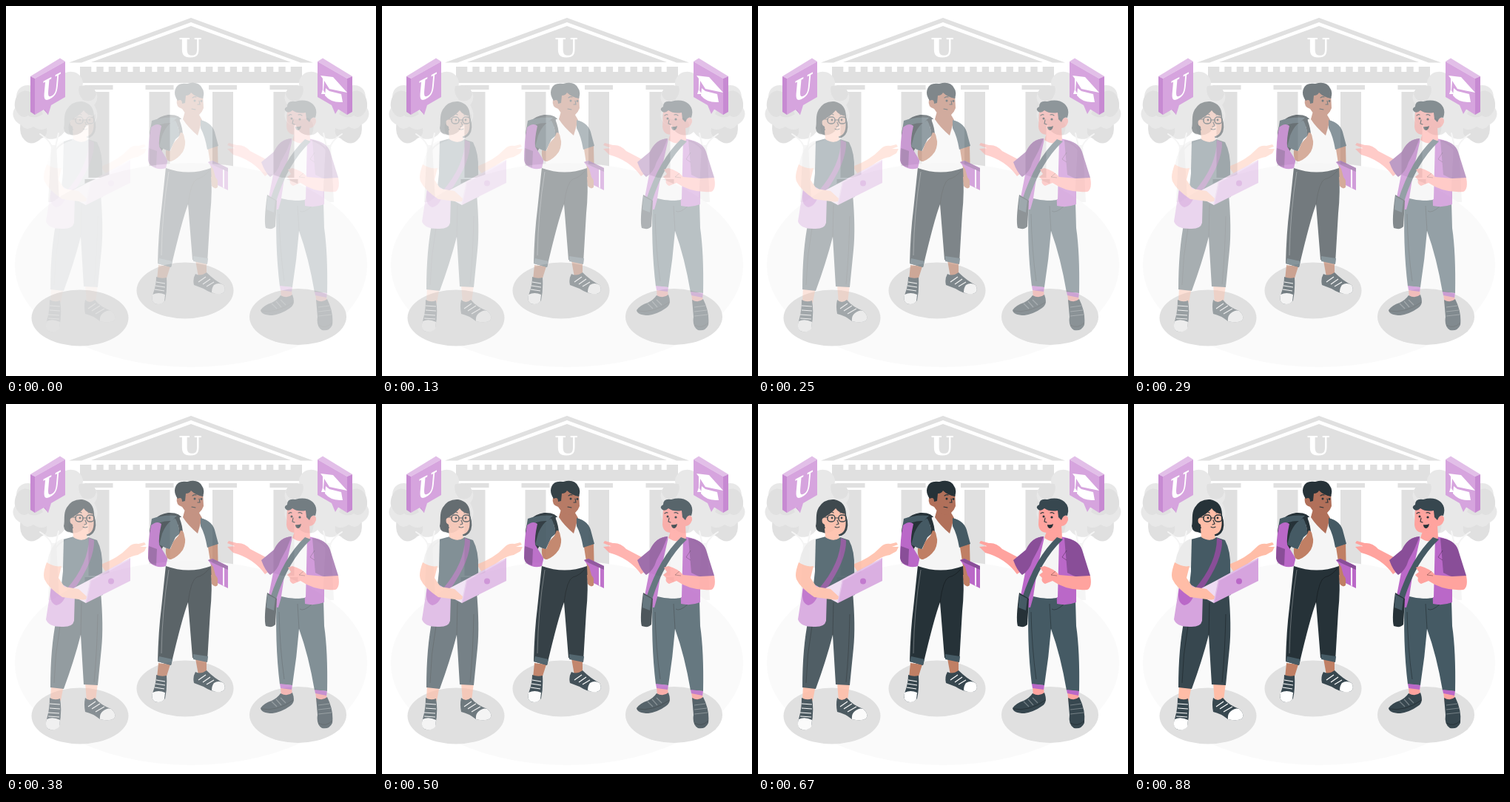
An HTML page that plays this animation: 500x500 px, repeating every 930 ms.

```html
<!DOCTYPE html>
<html lang="en">
<head>
<meta charset="utf-8">
<title>Students</title>
<style>
html, body { margin: 0; width: 100%; height: 100%; overflow: hidden; background: #fff; }
svg { display: block; width: 100vw; height: 100vh; }
text { font: bold 36px "DejaVu Serif", serif; text-anchor: middle; fill: #fff; }
.g { fill: #e0e0e0 } .w { fill: #fff } .off { fill: #f5f5f5 }
.k { fill: #263238 } .d { fill: #37474f } .s { fill: #455a64 }
.p { fill: #ba68c8 } .pl { fill: #d6a4de } .pt { fill: #e2bfe8 } .pd { fill: #894e98 } .ps { fill: #c78ad2 }
.tan { fill: #b1705a } .brown { fill: #c07f64 } .peach { fill: #ffbda7 } .pink { fill: #ffa39e }
.line { fill: none; stroke: #263238; stroke-width: 1.1; stroke-linecap: round }
.lace { fill: none; stroke: #fff; stroke-width: 1.2 }
.crease { fill: none; stroke: #000; stroke-opacity: .3; stroke-width: 1 }
</style>
</head>
<body>
<svg viewBox="0 0 500 500">
  <defs>
    <g id="tree">
      <path fill="#e8e8e8" d="M19 160C5 152 8 137 18 134C7 116 22 103 35 108C40 91 67 85 77 92C93 82 108 97 103 109C121 105 129 123 119 134C129 149 121 163 108 161C105 176 85 178 79 170C69 184 53 180 50 176C41 191 18 185 19 160Z"/>
      <path class="g" d="M12 137C10 118 25 109 35 118V137Q47 136 50 146Q38 154 30 148Q19 155 12 137ZM20 160Q27 170 37 163Q47 170 55 165Q57 176 47 179Q35 191 25 181Q17 173 20 160ZM99 108Q119 104 122 119Q119 132 104 127Q96 118 99 108ZM92 151Q109 158 121 146Q122 162 108 161Q103 176 87 174Q80 160 92 151Z"/>
      <path fill="none" stroke="#f5f5f5" stroke-width="2" stroke-linecap="round" d="M63 194Q61 182 46 173M66 194L71 172M65 199Q70 186 88 181"/>
      <path fill="#f5f5f5" d="M61 188H68L72 265H57Z"/>
    </g>
  </defs>

  <path class="g" d="M85 76.5L250 16L415 76.5H398L250 22L102 76.5ZM115 76L250 27L385 76ZM100 82H400V104H100Z"/>
  <path stroke="#fff" stroke-width="7" stroke-dasharray="7 9.4" d="M115.300 85.500H385"/>
  <text x="249" y="69">U</text>
  <g id="columns" class="g"></g>
  <use href="#tree"/>
  <use href="#tree" transform="matrix(-1 0 0 1 500 0)"/>
  <ellipse cx="250" cy="350" rx="238" ry="138" fill="#fafafa"/>
  <g class="g">
    <ellipse cx="100" cy="421.500" rx="65.500" ry="38"/>
    <ellipse cx="242" cy="384.500" rx="65.500" ry="38"/>
    <ellipse cx="394.500" cy="420" rx="65.500" ry="38"/>
  </g>

  <path class="pt" d="M33 95L73 70.500L80 75L39 98Z"/>
  <path class="ps" d="M33 95L39 98V147L33 143ZM51 140L57 137V147Z"/>
  <path class="pl" d="M39 98L80 75V123L61 134L57 147L52 139.500L39 147Z"/>
  <text transform="matrix(.8 -.42 -.1 1.120 59.500 125)">U</text>
  <path class="pt" d="M421 75L428 70.500L468 95L461 98Z"/>
  <path class="ps" d="M461 98L468 95V143L461 147Z"/>
  <path class="pl" d="M421 75L461 98V147L449 139.500L445 146L440 134L421 123Z"/>
  <path class="w" d="M425 94L442 96L461 117L437 112L430 101L429 114L432 119H426L428 113V98ZM432 111L437 115L453 119L455 130Q439 131 431 121Z"/>

  <g id="middle">
    <path class="k" d="M194 172Q196 151 219 147Q235 146 239 156L220 180L208 200Q196 200 194 172Z"/>
    <path class="s" d="M197 155Q214 149 231 151L224 158Q209 157 195 167Z"/>
    <path class="p" d="M196 164Q204 157 210 162Q206 180 207 190L218 208V218Q211 222 202 219Q193 216 192 208Q192 182 196 164Z"/>
    <path class="pd" d="M193 192L204 196L203 218Q193 216 192 208Z"/>
    <path class="brown" d="M206 350L222 352L216 371L204 370ZM256 344L271 346V365L260 366ZM272 190L286 187L287 235Q287 248 282 246L274 232Z"/>
    <path class="k" d="M216 218Q246 228 277 218Q279 253 276 280L272 348L252 343L246 268Q238 289 223 353L205 348Q206 306 210 275Z"/>
    <path class="s" d="M207 341L225 345L223 353L205 348ZM253 338L273 341L272 349L253 345Z"/>
    <path class="crease" d="M275 222Q267 232 258 234Q250 237 246 268"/>
    <path class="crease" style="stroke:#fff" d="M220 224Q211 278 210 337"/>
    <path class="off" d="M235 153L264 153Q273 166 272 187L277 219Q247 230 216 219L222 193Z"/>
    <path class="tan" d="M242 142H258L265 154L259 175Q246 164 239 153Z"/>
    <path class="s" d="M263 154Q280 158 283 174L287 189L272 194Q269 176 263 165ZM235 153Q219 155 211 175L207 190L221 197L229 180L235 175L232 161Z"/>
    <path class="k" d="M228 153L234 153Q239 165 239 176L234 178Q235 165 228 153Z"/>
    <path class="brown" d="M222 196L226 186Q230 181 233 178L236 171Q240 170 241 178Q244 187 239 197Q232 207 223 210Q215 211 216 195Z"/>
    <path class="tan" d="M231 126Q233 120 240 119L255 112L266 119L267 138Q263 149 253 150Q243 148 238 139Q229 137 231 126Z"/>
    <path class="k" d="M232 128Q226 119 229 112Q232 103 245 105Q260 101 265 111Q269 116 266 125Q256 123 250 117Q248 121 243 121L242 131L238 132Q238 125 232 128Z"/>
    <path class="line" d="M252 124Q255 122 257 123M262 123.500Q264 122 266 124M251 139L256 140M261 128L262 133L259 133"/>
    <circle class="k" cx="255" cy="128" r="1.500"/><circle class="k" cx="264" cy="128.500" r="1.400"/>
    <path class="p" d="M273 211L279 209L300 219V249L286 242L280 220Z"/>
    <path class="w" d="M293 220L295 221V246L293 245Z"/>
    <path class="pd" d="M273 211L280 215L300 224V219L279 209Z"/>
    <path class="brown" d="M277 231Q284 230 286 236L286 245Q281 248 278 243Z"/>
    <path class="d" d="M203 366Q210 369 217 367Q218 384 215 398Q209 405 201 402Q195 398 199 388Q203 377 203 366ZM256 362Q263 366 271 360Q282 371 294 377Q299 387 290 389Q279 390 267 382L254 377Q252 369 256 362Z"/>
    <path class="w" d="M198 390Q206 386 215 390L214 399Q209 405 201 402Q196 399 198 390ZM281 377Q287 373 294 377Q299 387 290 389Q284 390 278 387Q278 381 281 377Z"/>
    <path class="lace" d="M203 373L215 375M202 378L215 380M201 383L214 385M260 373L270 366M266 376L276 369M271 379L281 373"/>
  </g>

  <g id="left">
    <path class="peach" d="M61 380H78L74 401L60 400ZM107 377H124L121 401L109 402Z"/>
    <path class="d" d="M73 255L128 254Q132 300 129 330L124 380L105 379L101 312Q92 347 78 385L60 383Q60 329 68 291Z"/>
    <path class="crease" d="M102 268L101 312M124 284Q123 335 119 376M73 300Q66 338 65 377"/>
    <path class="k" d="M78 165C80 157 77 149 82 140Q89 128 103 129Q119 132 119 150Q124 166 118 174Q112 181 101 178L86 173Q79 173 78 165Z"/>
    <path class="peach" d="M128 217Q152 208 165 194Q170 188 179 189L187 187L189 190L181 193L190 193L187 199L178 204Q164 205 137 230Z"/>
    <path class="s" d="M77 183L92 179Q102 187 111 180L123 184Q131 199 130 222L131 258Q103 267 73 262L77 226Z"/>
    <path fill="#ebebeb" d="M78 182Q65 184 58 204L55 217Q64 224 77 221Z"/>
    <path class="peach" d="M90 168H107L110 181Q102 187 91 180Z"/>
    <path class="peach" d="M90 153Q99 148 105 141Q109 147 117 148Q121 166 115 173Q107 180 96 174Q90 170 90 163Q85 160 87 155Z"/>
    <path class="line" d="M90 153H94M104 154H109M96 147Q100 145 102 147M111 147Q114 146 116 148M104 166Q107 168 110 166M107 157L109 162L106 163"/>
    <g class="line" style="stroke-width:1.5"><rect x="94" y="150" width="10" height="9" rx="4"/><rect x="109" y="150" width="10" height="9" rx="4"/></g>
    <circle class="k" cx="100" cy="154" r="1.400"/><circle class="k" cx="113" cy="154" r="1.400"/>
    <path class="pd" d="M112 181L119 184Q120 211 91 252L82 250Q112 215 112 181Z"/>
    <path class="pl" d="M61 246Q74 236 93 257L92 293Q90 302 75 301Q57 301 54 291Z"/>
    <path class="p" d="M61 248Q68 245 82 255Q78 270 68 272Q57 269 61 248Z"/>
    <path fill="#efdcf3" d="M91 249L114 237L133 238L108 269L93 261Z"/>
    <path class="peach" d="M55 214Q66 221 75 219L71 235L79 247L98 250L110 261Q110 266 99 264L76 261Q57 248 52 237Q49 230 55 214Z"/>
    <path class="pl" d="M114 237L168 208V239L108 269Z"/>
    <path class="pt" d="M114 237L168 208L166 211L115 239L109 267L107 269Z"/>
    <circle class="p" cx="142" cy="239.500" r="4"/>
    <path class="d" d="M59 397Q66 401 73 398Q76 415 72 435Q66 443 57 439Q52 434 56 422Q59 411 59 397ZM107 397Q113 403 120 397Q128 407 142 412Q150 419 146 425Q140 429 127 426Q117 418 107 416Q105 406 107 397Z"/>
    <path class="w" d="M55 426Q63 422 73 427L72 436Q66 443 57 439Q52 435 55 426ZM131 415Q137 410 142 412Q150 419 146 425Q140 429 127 426Q126 419 131 415Z"/>
    <path class="lace" d="M59 405L73 406M59 411L73 412M57 417L72 418M57 422L72 423M111 409L121 402M116 412L127 405M121 416L133 409"/>
  </g>

  <g id="right">
    <path class="pink" d="M371 381H386L387 397L372 398ZM418 389H433L434 404L420 404Z"/>
    <path class="s" d="M366 256Q390 266 408 261L429 264L430 300Q435 334 434 388L417 387Q409 340 396 304Q393 342 387 380L370 379Q363 323 366 256Z"/>
    <path class="p" d="M370 378L387 380L386 386L371 384ZM417 386L434 388L433 394L418 391Z"/>
    <path class="crease" d="M394 270L396 304M414 270Q402 281 397 277M369 281Q370 330 376 372"/>
    <path class="p" d="M386 179Q374 180 369 187L352 274L368 275L378 240L388 190ZM407 179Q430 181 438 198L430 234V268Q417 273 404 270L402 205Z"/>
    <path class="off" d="M387 180L407 180L405 261Q390 265 372 260L378 220Z"/>
    <path class="pink" d="M358 210L343 216Q329 199 314 194L299 188L301 185L312 188Q322 187 330 196L351 207ZM346 210L358 224L350 230Q334 208 307 201L299 193L309 192L318 189Z"/>
    <path class="pd" d="M386 179Q370 180 362 197L345 211Q350 225 357 231Q367 225 371 211L379 196ZM414 181Q433 183 438 197L449 232Q440 237 430 234L418 228Z"/>
    <path class="pink" d="M391 169L410 163L411 181Q400 190 387 181Z"/>
    <path class="s" d="M404 180L412 183Q381 212 365 264L357 262Q375 207 404 180Z"/>
    <path class="pink" d="M449 232Q452 248 445 251Q418 253 398 239L388 243Q382 240 384 235L380 231L385 227L381 221L387 219Q401 223 407 231L430 233Z"/>
    <path class="crease" d="M402 226L396 231L404 232M417 198L411 207L417 211"/>
    <path class="pink" d="M380 141L402 137L411 151Q420 149 419 157Q416 165 410 165Q404 175 391 174Q380 174 379 163Z"/>
    <path class="d" d="M379 143Q374 139 380 136Q380 127 391 129Q405 125 414 132Q422 139 418 151Q413 149 410 157L406 153L405 144Q394 146 387 141Q383 145 379 143Z"/>
    <path class="line" d="M382 148Q384 146 386 147M395 147Q398 146 400 148M388 154L387 159L390 160"/>
    <path class="k" d="M391 163Q395 164 399 162Q398 168 394 168Q391 167 391 163Z"/>
    <circle class="k" cx="386" cy="152" r="1.500"/><circle class="k" cx="397" cy="153" r="1.600"/>
    <path class="k" d="M353 255L366 263L364 298Q360 303 351 300Q348 291 353 255Z"/>
    <path class="s" d="M353 257L364 263L362 279L352 275Z"/>
    <path class="d" d="M371 391Q380 396 387 390Q392 403 384 408Q373 416 360 418Q345 418 344 411Q349 404 359 401Q367 397 371 391ZM419 397Q427 402 434 396Q443 414 441 431Q437 440 427 438Q419 433 421 420Z"/>
    <path class="lace" opacity=".3" d="M359 402L366 409M365 399L372 407M371 397L378 404M422 407L437 405M422 413L439 411M422 419L440 417"/>
    <path class="crease" d="M345 412Q365 416 389 400M422 431Q432 437 441 428"/>
  </g>
</svg>
<script>
const LOOP = 930, STEP = 1000 / 24, LAST = 21;
const fades = [["middle", .24, 1.36], ["right", .2, 1.22], ["left", .07, 1.2]]
  .map(([id, start, rate]) => ({ style: document.getElementById(id).style, start, rate }));

document.getElementById("columns").innerHTML = [125.5, 207.5, 293, 375.5].map(x =>
  `<path d="M${x - 19} 107h38v6h-38zM${x - 14} 116h28v116h-28zM${x - 19} 234h38v6h-38z"/>`).join("");

function draw(now) {
  const step = Math.min(LAST, Math.floor((now % LOOP + 4) / STEP));
  const seconds = step * STEP / 1000;
  for (const { style, start, rate } of fades) style.opacity = Math.min(1, start + rate * seconds);
  requestAnimationFrame(draw);
}
draw(performance.now());
</script>
</body>
</html>
```
